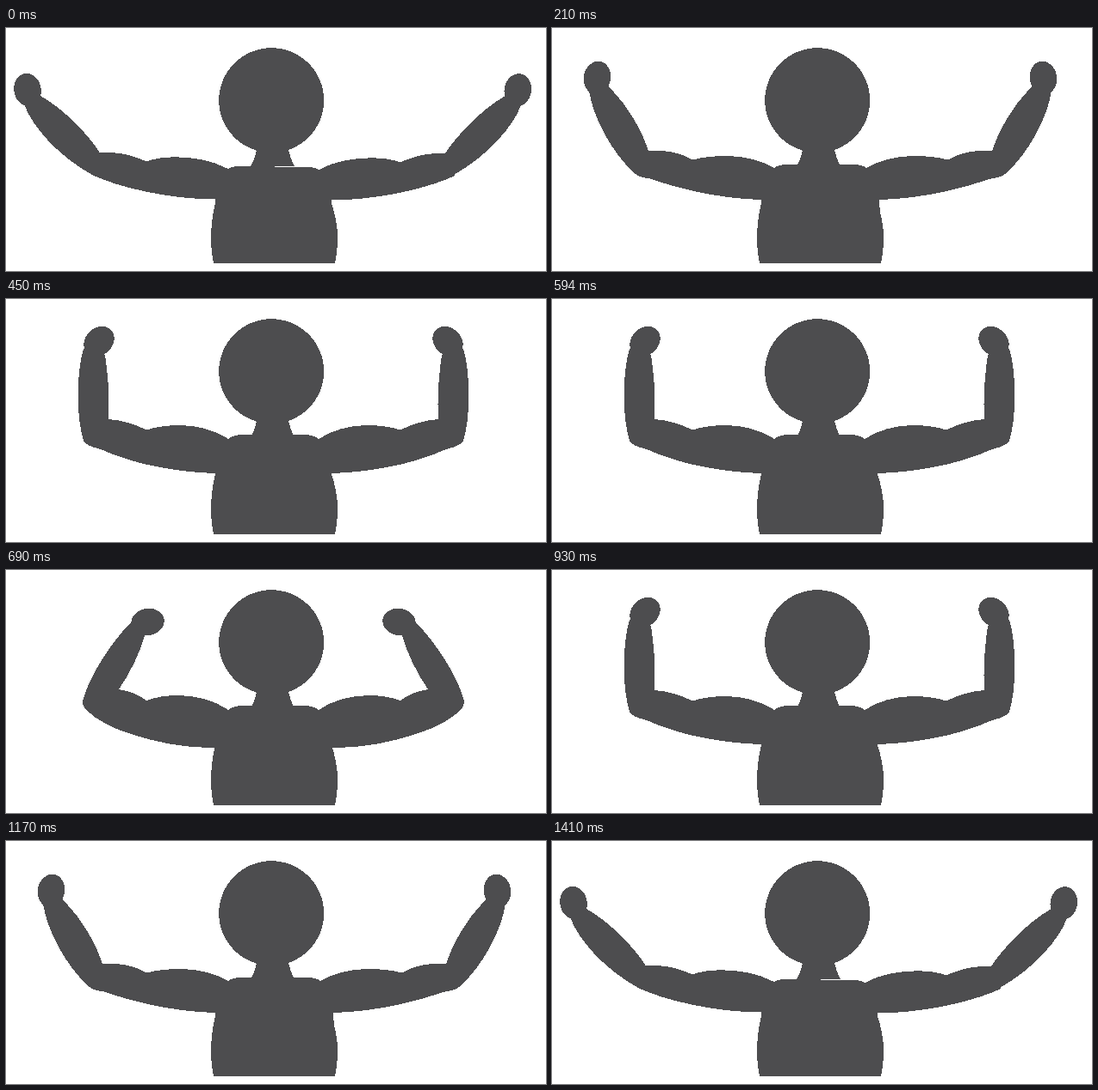
Animation, 627 px wide and 283 px high, one loop 1.44 s. Source, as an HTML page:

```html
<!DOCTYPE html>
<html lang="en">
<head>
<meta charset="utf-8">
<title>Flexing arms</title>
<style>
  html, body { margin: 0; width: 100%; height: 100%; overflow: hidden; background: #fff; }
  svg { display: block; width: 627px; height: 283px; fill: #4d4d4f; shape-rendering: crispEdges; }
  .pose { animation: 1440ms step-end infinite; visibility: hidden; }
  .wide { animation-name: wide; }
  .raised { animation-name: raised; }
  .upright { animation-name: upright; }
  .flexed { animation-name: flexed; }

  /* Poses swap hard: wide, raised, upright, flexed, and back. */
  @keyframes wide {
    0%, 97.9167% { visibility: visible; }
    14.5833% { visibility: hidden; }
    100% { visibility: visible; }
  }
  @keyframes raised {
    0%, 31.25%, 97.9167%, 100% { visibility: hidden; }
    14.5833%, 81.25% { visibility: visible; }
  }
  @keyframes upright {
    0%, 47.9167%, 81.25%, 100% { visibility: hidden; }
    31.25%, 64.5833% { visibility: visible; }
  }
  @keyframes flexed {
    0%, 64.5833%, 100% { visibility: hidden; }
    47.9167% { visibility: visible; }
  }
</style>
</head>
<body>
<svg viewBox="0 0 627 283" role="img" aria-label="Figure flexing both arms">
  <defs>
    <ellipse id="hand" rx="15.7" ry="19.3"/>

    <path id="wide-upper" d="M287 161 H270 Q262 161 258 164.3 C241 154 215 150.3 197 150.3 Q178 150.3 163 155.3
      Q146 148 132 146 Q118 144.3 109 145.3 L100 171 C130 185.5 190 199.5 243 199.5 V205 L242 213 H312 V161 Z"/>
    <g id="wide-fore">
      <path d="M132 150 L109 145.3 C98 127.5 68 94.5 40 79 L21.5 90 C30.5 114.5 60 148.5 100 171 Z"/>
      <use href="#hand" transform="translate(25 72) rotate(-10)"/>
    </g>

    <g id="raised-arm">
      <path d="M287 159 H274 Q263 159 258 163 C243 154 222 149 203 149 Q180 149 163 153.5
        Q150 146 136 144 Q122 142 112 143 C105 120 89 92 66 68 L43 73
        C47 102 69 146 97 170 Q101 174 112 175 Q138 184 165 190 Q205 199 243 200 V205 L242 213 H312 V159 Z"/>
      <use href="#hand" transform="translate(52.5 58) rotate(10)"/>
    </g>

    <g id="upright-arm">
      <path d="M287 158 H276 Q264 158 258 163 C243 153 222 147 202 147 Q180 147 163 152.5
        Q143 142 119 140 Q121 106 115 65 L90 58 C82 84 81 136 90 165 Q93 171 110 175
        Q135 186 164 193 Q205 202 243 203 V206 L242 213 H312 V158 Z"/>
      <use href="#hand" transform="translate(108 49.5) rotate(45)"/>
    </g>

    <g id="flexed-arm">
      <path d="M287 158 H276 Q264 158 258 163 C243 152 220 146 199 146 Q180 146 163 152
        Q150 142 131 139 Q151 110 162 74 L146 60 C122 84 96 125 89.5 151 Q88 157 92 162
        C105 175 125 185 145 191 Q190 206 235 207 H243 L242 213 H312 V158 Z"/>
      <use href="#hand" transform="translate(164.5 60.5) rotate(80)"/>
    </g>
  </defs>

  <circle cx="308.2" cy="84.2" r="61"/>
  <path d="M292 136 Q290.5 150 284 161 H335 Q329 150 327 136 Z"/>
  <path d="M243 204 Q238 225 238 245 Q238 260 241 273.5 H382 Q385 260 385 245 Q385 225 378 204 Z"/>

  <g class="pose wide">
    <use href="#wide-upper"/>
    <use href="#wide-upper" transform="matrix(-1 0 0 1 621 1)"/>
    <use href="#wide-fore"/>
    <use href="#wide-fore" transform="matrix(-1 0 0 1 619.3 .4)"/>
  </g>
  <g class="pose raised">
    <use href="#raised-arm"/>
    <use href="#raised-arm" transform="matrix(-1 0 0 1 623 0)"/>
  </g>
  <g class="pose upright">
    <use href="#upright-arm"/>
    <use href="#upright-arm" transform="matrix(-1 0 0 1 621 0)"/>
  </g>
  <g class="pose flexed">
    <use href="#flexed-arm"/>
    <use href="#flexed-arm" transform="matrix(-1 0 0 1 621 0)"/>
  </g>
</svg>
</body>
</html>
```
